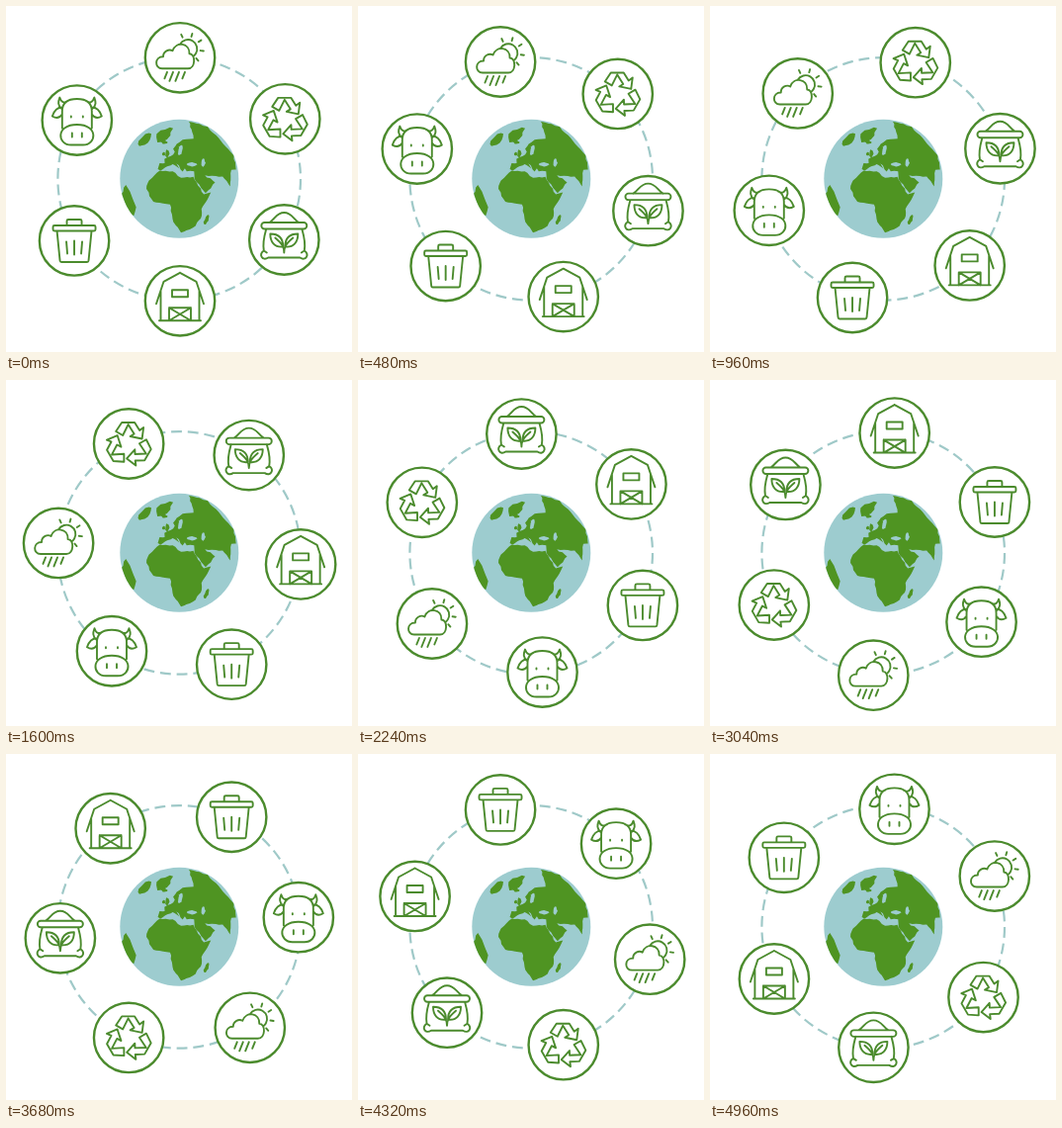
An HTML page with a canvas for the animation above (5120 ms loop, 350 px wide and 350 px high).

```html
<!DOCTYPE html>
<html lang="en">
<head>
<meta charset="utf-8">
<title>Farm cycle around the globe</title>
<style>
  html, body { margin: 0; width: 100%; height: 100%; overflow: hidden; background: #fff; }
  canvas { display: block; width: 350px; height: 350px; }
</style>
</head>
<body>
<canvas id="stage"></canvas>
<script>
const SIZE = 350, LOOP = 5120, STEP = 160, TAU = Math.PI * 2, RAD = TAU / 360;
const GREEN = '#4b8b2d', LAND = '#4f9422', SEA = '#9dcccf', DASH = '#9fc9c8';
const canvas = document.getElementById('stage');
const ctx = canvas.getContext('2d');
const dpr = window.devicePixelRatio || 1;
canvas.width = canvas.height = SIZE * dpr;

// Globe: key points in lon,lat, seen orthographically, with seeded rough coasts
const globe = { x: 175.3, y: 174.8, r: 60, lon: 18, lat: 30 };
let seed = 11;
const jitter = size => {
  seed = seed * 16807 % 2147483647;
  return (seed / 2147483647 - 0.5) * 2 * size;
};

function project(lon, lat) {
  const d = (lon - globe.lon) * RAD, p = lat * RAD, q = globe.lat * RAD;
  const x = Math.cos(p) * Math.sin(d);
  const y = Math.cos(q) * Math.sin(p) - Math.sin(q) * Math.cos(p) * Math.cos(d);
  return [globe.x + x * globe.r, globe.y - y * globe.r];
}

function coast(text) {
  const points = text.split(' ').map(p => project(...p.split(',').map(Number)));
  const path = new Path2D();
  points.forEach(([x, y], i) => {
    const [nx, ny] = points[(i + 1) % points.length];
    const parts = Math.ceil(Math.hypot(nx - x, ny - y) / 4);
    path.lineTo(x, y);
    for (let k = 1; k < parts; k++) {
      const f = k / parts;
      path.lineTo(x + (nx - x) * f + jitter(0.7), y + (ny - y) * f + jitter(0.7));
    }
  });
  path.closePath();
  return path;
}

function blob(lon, lat, rx, ry, tilt = 0) {
  const [cx, cy] = project(lon, lat);
  const c = Math.cos(tilt), s = Math.sin(tilt), path = new Path2D();
  for (let a = 0; a < TAU; a += TAU / 12) {
    const k = 1 + jitter(0.22), x = rx * k * Math.cos(a), y = ry * k * Math.sin(a);
    path.lineTo(cx + x * c - y * s, cy + x * s + y * c);
  }
  path.closePath();
  return path;
}

const lands = [
  coast('-17,15 -16,24 -6,36 10,37 20,31 34,31 43,12 51,12 40,-3 40,-15 33,-27 20,-35 12,-17 9,4 -8,4'),
  coast('-9,37 -9,43 -2,44 -4,48 8,54 10,57 6,60 12,66 28,71 60,69 100,78 170,70 150,50 120,20 ' +
    '100,15 88,21 78,8 70,22 48,30 58,20 45,13 35,29 36,36 27,37 25,40 22,37 14,45 18,40 9,44 0,40 -5,36'),
  blob(-40, 72, 10, 5, -0.6),
  blob(-62, 54, 8, 4, -0.8),
  blob(-42, -8, 5, 15, -0.35),
  blob(-19, 65, 3, 2),
  blob(-2, 54, 2, 4),
  blob(-8, 53, 1.5, 2),
  blob(47, -19, 2, 5, 0.4)
];
const seas = [blob(20, 59, 2, 5, 0.3), blob(35, 43, 5, 2), blob(51, 42, 2, 4)];

function drawGlobe() {
  ctx.save();
  ctx.beginPath();
  ctx.arc(globe.x, globe.y, globe.r, 0, TAU);
  ctx.fillStyle = SEA;
  ctx.fill();
  ctx.clip();
  ctx.fillStyle = LAND;
  lands.forEach(p => ctx.fill(p));
  ctx.fillStyle = SEA;
  seas.forEach(p => ctx.fill(p));
  ctx.restore();
}

// Line icons centred on 0,0; symmetric ones give their right half only
function mirror(half) {
  const path = new Path2D(half);
  path.addPath(new Path2D(half), new DOMMatrix([-1, 0, 0, 1, 0, 0]));
  return path;
}

function bar(path, width, top, height, round = 0) {
  path.roundRect(-width / 2, top, width, height, round);
  return path;
}

function weather() {
  const path = new Path2D('M-18 11C-26 11-26-1-17-1C-17-7-11-9-7.5-7C-4-17 10-15 9.5-4C16-4 16 11 8 11Z');
  const ray = (a, r) => [8 + r * Math.cos(a * RAD), -9 + r * Math.sin(a * RAD)];
  path.moveTo(...ray(210, 9.3));
  path.arc(8, -9, 9.3, 210 * RAD, 415 * RAD);
  for (let a = -115; a <= 50; a += 41) {
    path.moveTo(...ray(a, 12.8));
    path.lineTo(...ray(a, 16));
  }
  for (let i = 0; i < 4; i++) {
    const x = -13 + i * 6, long = i % 3 ? 9 : 6.5;
    path.moveTo(x, 14.5);
    path.lineTo(x - long * 0.4, 14.5 + long);
  }
  return path;
}

function recycle() {
  const path = new Path2D();
  const arm = new Path2D('M-13-13L-7-22H6L11-14L15-17L13.5-5.5L1.5-8L5.5-10.5L-.5-20L-6-9Z');
  for (let i = 0; i < 3; i++) path.addPath(arm, new DOMMatrix().translate(0, 0.5).rotate(i * 120));
  return path;
}

function bag() {
  const path = mirror('M15-17.5C9-21 8-27.5 0-27.5M18-11C20-4 22 2 20.5 11' +
    'M17.5 13L20.5 11C26 15 22 22 16 18H0M0 13C0 7 2 4 9-2M1 7C1-2 6-6 14-6C14 2 10 8 1 7Z');
  return bar(path, 46, -17.5, 6.5, 3.2);
}

function barn() {
  const path = mirror('M0-28.5L16.5-19.5L24 3M19.5-10V20M0 20H21M0 13.5L11 7M0 13.5L11 20');
  bar(path, 16, -11, 7);
  return bar(path, 22, 7, 13);
}

function bin() {
  const path = mirror('M0-21.5H6Q7.5-21.5 7.5-20V-15.5M17.5-10L14.5 20Q14.3 21.5 13 21.5H0M8 1L7 13M0 0V14');
  return bar(path, 43, -15.5, 5.5, 1.5);
}

const cow = () => mirror('M0-21.5C9-21.5 15-18 15-9V8M0 4.5C22 4.5 20 25 6 25H0' +
  'M15-11C20-15 19-19 17.5-23C16-18 13-17 9-19.5' +
  'M15-13C20-13 23-10 25-4C20-1 17-3 15-6M6-4v1M5 13v4');

// Clockwise from the top, each with its orbit radius
const icons = [
  { path: weather(), r: 123.4 },
  { path: recycle(), r: 122.7 },
  { path: bag(), r: 121.6 },
  { path: barn(), r: 122.6 },
  { path: bin(), r: 123.5 },
  { path: cow(), r: 120.3 }
];

// Degrees turned: speeds up over three steps, then runs steadily
const turned = n => n < 3 ? n * n * 10 / 6 : (n - 1.5) * 10;

function drawRing() {
  const r = 122.8, period = TAU * r / 46;
  ctx.save();
  ctx.beginPath();
  ctx.arc(175.2, 174.9, r, 0, TAU);
  ctx.strokeStyle = DASH;
  ctx.lineWidth = 2.2;
  ctx.lineCap = 'butt';
  ctx.setLineDash([period * 0.65, period * 0.35]);
  ctx.stroke();
  ctx.restore();
}

function drawIcon(icon, deg) {
  const a = deg * RAD;
  ctx.save();
  ctx.translate(176 + icon.r * Math.sin(a), 175.7 - icon.r * Math.cos(a));
  ctx.beginPath();
  ctx.arc(0, 0, 35.2, 0, TAU);
  ctx.fillStyle = '#fff';
  ctx.fill();
  ctx.strokeStyle = GREEN;
  ctx.lineWidth = 2.4;
  ctx.stroke();
  ctx.lineWidth = 1.9;
  ctx.stroke(icon.path);
  ctx.restore();
}

function draw(time) {
  const turn = turned(Math.floor((time % LOOP) / STEP));
  ctx.setTransform(dpr, 0, 0, dpr, 0, 0);
  ctx.fillStyle = '#fff';
  ctx.fillRect(0, 0, SIZE, SIZE);
  ctx.lineCap = ctx.lineJoin = 'round';
  drawRing();
  drawGlobe();
  icons.forEach((icon, i) => drawIcon(icon, i * 60 - turn));
}

const start = performance.now();
function tick() {
  draw(performance.now() - start);
  requestAnimationFrame(tick);
}
tick();
</script>
</body>
</html>
```
